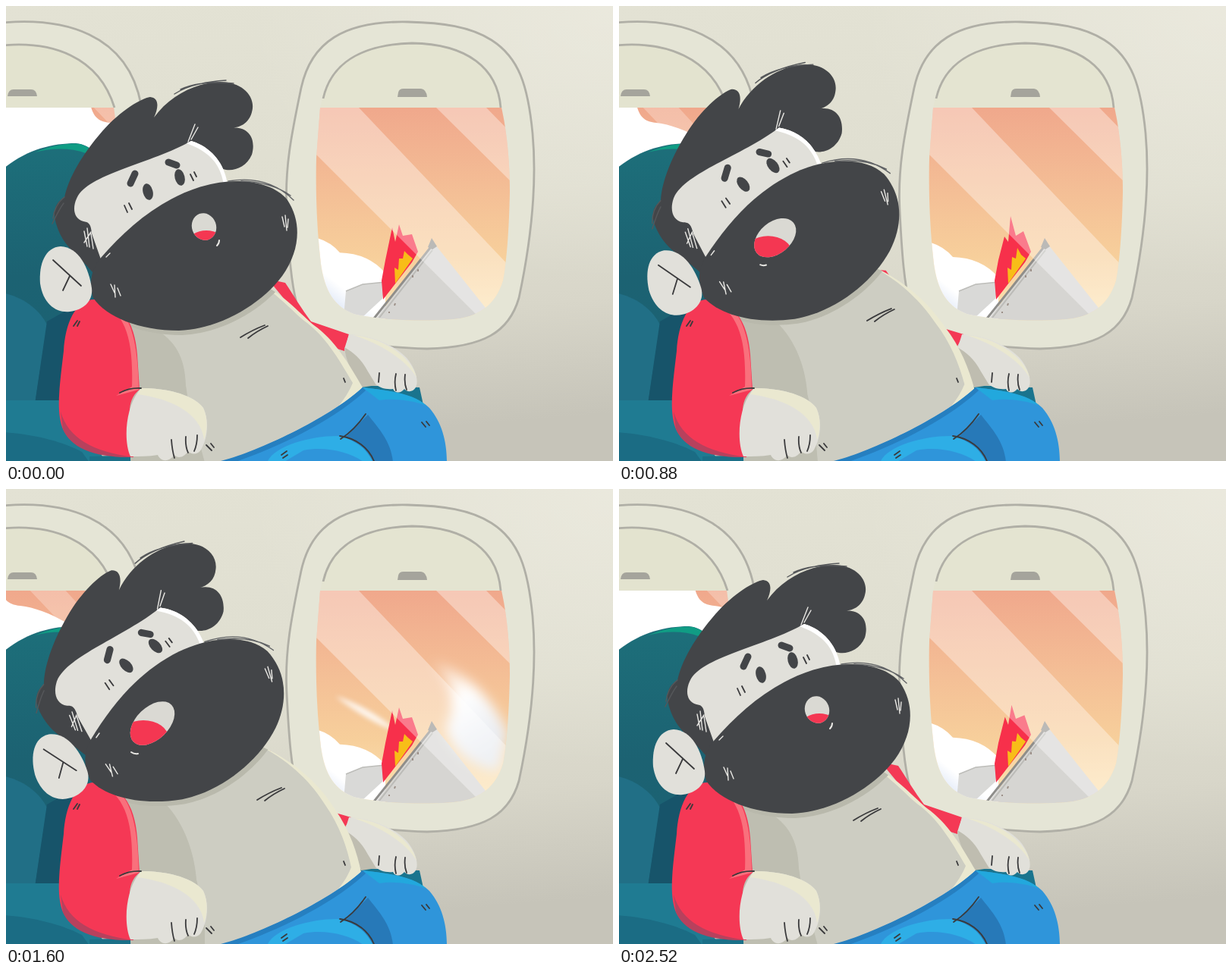
Write an HTML page that moves like this. It is 800 by 600 pixels and loops after 2560 ms.

```html
<!DOCTYPE html>
<html lang="en">
<head>
<meta charset="utf-8">
<title>Calm passenger</title>
<style>
html,body{margin:0;width:100%;height:100%;overflow:hidden;background:#dedbce}
svg{display:block;width:800px;height:600px}
.ink{fill:none;stroke:#3a3a3c;stroke-width:1.8;stroke-linecap:round}
.rim{fill:none;stroke:#b0afa6;stroke-width:2.8}
.thin{fill:none;stroke:#e9e8e4;stroke-width:1.4;stroke-linecap:round}
.hair{fill:#434548}
.skin{fill:#e1e0da}
.cream{fill:#eae8d0}
</style>
</head>
<body>
<svg viewBox="0 0 800 600">
<defs>
  <linearGradient id="wall" x1="0" y1="0" x2=".12" y2="1">
    <stop offset="0" stop-color="#e3e2d4"/><stop offset=".5" stop-color="#dfded0"/>
    <stop offset=".75" stop-color="#d8d6c9"/><stop offset="1" stop-color="#c6c4b9"/>
  </linearGradient>
  <radialGradient id="glow" cx="1" cy="0" r=".6">
    <stop offset="0" stop-color="#f0eee4" stop-opacity=".6"/><stop offset="1" stop-color="#f0eee4" stop-opacity="0"/>
  </radialGradient>
  <linearGradient id="sky" gradientUnits="userSpaceOnUse" x1="0" y1="134" x2="0" y2="415">
    <stop offset="0" stop-color="#f0a88c"/><stop offset=".4" stop-color="#f4bf96"/>
    <stop offset=".7" stop-color="#f7cf9b"/><stop offset="1" stop-color="#fbe4b4"/>
  </linearGradient>
  <linearGradient id="mist" x1=".6" y1=".3" x2=".2" y2="1">
    <stop offset=".35" stop-color="#fff"/><stop offset=".8" stop-color="#cfdcf3"/>
  </linearGradient>
  <linearGradient id="seat" x1="0" y1="0" x2="0" y2="1">
    <stop offset="0" stop-color="#1d6f7a"/><stop offset=".5" stop-color="#1c6272"/><stop offset="1" stop-color="#1a6275"/>
  </linearGradient>
  <linearGradient id="vapour" x1="0" y1="0" x2=".4" y2="1">
    <stop offset="0" stop-color="#fff" stop-opacity=".3"/><stop offset=".4" stop-color="#fff"/>
    <stop offset="1" stop-color="#e3ebf7" stop-opacity=".9"/>
  </linearGradient>
  <filter id="soft" x="-50%" y="-50%" width="200%" height="200%"><feGaussianBlur stdDeviation="8"/></filter>
  <filter id="fine" x="-50%" y="-50%" width="200%" height="200%"><feGaussianBlur stdDeviation="3"/></filter>
  <clipPath id="glass"><path d="M414 134H653C659 160 664 200 664 245C663 295 660 335 655 362C645 395 622 410 590 413C550 416 500 415 462 407C432 398 420 375 415 340C409 290 408 240 409 200Z"/></clipPath>
  <clipPath id="sideGlass"><path d="M0 134H142Q147 165 147 230H0Z"/></clipPath>
  <clipPath id="lips"><ellipse id="lipShape"/></clipPath>
  <clipPath id="torso"><path id="torsoClip"/></clipPath>
  <path id="beardShape" d="M125 332C160 292 202 255 258 238C302 225 350 230 371 256C390 285 388 322 364 356C335 395 280 426 228 428C175 428 132 410 115 385C108 362 114 345 125 332Z"/>
  <path id="frame" d="M530 21C445 19 402 48 389 108C376 170 367 215 370 270C373 330 376 365 383 392C392 432 440 448 555 452C630 450 663 430 676 385C692 310 700 235 694 168C688 105 676 68 640 45C612 27 575 22 530 21Z"/>
  <g id="wisp">
    <path d="M-42 -62C5 -48 38 -12 58 32L45 82C8 78 -22 50 -24 22C-10 2 -14 -32 -42 -62Z" fill="url(#vapour)" filter="url(#soft)"/>
    <path d="M-170 -17Q-125 -3 -88 30Q-125 18 -170 -17Z" fill="#fff" opacity=".85" filter="url(#fine)"/>
  </g>
</defs>

<rect width="800" height="600" fill="url(#wall)"/>
<rect width="800" height="600" fill="url(#glow)"/>

<!-- side window -->
<path d="M-5 22C75 15 160 35 177 125L185 260H-5Z" fill="#e5e5d6"/>
<path class="rim" d="M-5 22C75 15 160 35 178 130"/>
<path d="M-5 52C60 46 122 66 143 134H-5Z" fill="#e3e3cf"/>
<path class="rim" d="M-5 52C60 46 122 66 143 134"/>
<path d="M2 119Q3 110 10 110H33Q40 110 41 119Z" fill="#a5a49c"/>
<g clip-path="url(#sideGlass)">
  <rect y="130" width="150" height="100" fill="url(#sky)"/>
  <path d="M28 130H75L130 190H85ZM112 130H150V170Z" fill="#fff" opacity=".25"/>
  <path id="bank" d="M-200 120H0C4 145 10 152 28 154S68 164 88 176L100 240H-200Z" fill="#fff"/>
</g>

<!-- main window -->
<use href="#frame" fill="#e5e5d6"/>
<use href="#frame" class="rim"/>
<path d="M414 134C423 82 460 51 535 49C610 50 650 82 653 134Z" fill="#e4e4d1"/>
<path class="rim" d="M418 122C428 78 465 51 535 49C608 50 648 82 652 134"/>
<path d="M516 120L517 114Q518 109 524 109H547Q554 110 555 120Z" fill="#a5a49c"/>
<g clip-path="url(#glass)">
  <rect x="400" y="130" width="270" height="290" fill="url(#sky)"/>
  <path id="cloud" d="M405 310Q428 316 440 331Q478 332 500 358V440H405Z" fill="url(#mist)"/>
  <path d="M448 376L470 367L500 364L496 386L470 410H445Z" fill="#d9d9d7"/>
  <path d="M448 376L470 367L500 364" fill="none" stroke="#bdbdb9" stroke-width="1.5"/>
  <path d="M566 315L632 398L620 420H482L556 322Z" fill="#d6d5d2"/>
  <use id="wispA" href="#wisp"/><use id="wispB" href="#wisp"/>
  <path d="M556 318L561 306L568 317L562 321Z" fill="#94928e"/>
  <path id="fire" fill="#f7304b"/>
  <path id="core" fill="#f8bd18"/>
  <path d="M559 319L485 412" stroke="#8f8e8b" stroke-width="3"/>
  <path d="M562 322L492 411" stroke="#bcbbb7" stroke-width="2"/>
  <path d="M543 347v3M536 355v3M513 392l-1 3M505 403v2" stroke="#9c8f88" stroke-width="2"/>
  <path d="M400 187L620 407L670 420V350L465 134H400ZM567 134H633L670 172V236Z" fill="#fff" opacity=".36"/>
</g>

<!-- seat -->
<path d="M-5 216C25 190 60 181 92 181C112 182 128 200 140 240L150 530H-5Z" fill="url(#seat)"/>
<path d="M38 193C62 183 85 180 98 182L112 188L105 194C85 187 62 187 38 193Z" fill="#109c84"/>
<path d="M-5 378C25 384 45 402 54 420L38 525H-5Z" fill="#216f86"/>
<path d="M54 416L100 390V525H38Z" fill="#17546a"/>
<path d="M-5 520H90L130 600H-5Z" fill="#1f7b92"/>
<path d="M-5 562C40 565 75 575 100 588L110 602H-5Z" fill="#1b6c84"/>
<path d="M110 594L170 592L262 572V602H110Z" fill="#1b7088"/>
<path d="M462 500L545 503L550 526L470 530Z" fill="#1a748e"/>

<!-- far arm -->
<path id="farArm" fill="#f43955"/>
<path d="M452 433C482 434 512 447 528 464C541 480 544 495 540 503C536 510 528 509 525 505C520 511 513 511 510 505C500 506 492 503 488 499L470 502C455 480 448 465 446 452Z" class="skin"/>
<path d="M446 450C458 457 468 465 477 482L488 500L468 503C455 482 447 465 446 450Z" fill="#bfbdb0"/>
<path d="M458 434C495 437 535 462 541 490C528 466 490 444 458 434Z" class="cream"/>
<path class="ink" d="M492 484L491 496M514 485C512 493 512 499 514 507M526 486C525 494 526 501 528 506"/>

<!-- torso -->
<path id="torsoEdge" class="cream"/>
<g clip-path="url(#torso)">
  <path id="torsoFill" fill="#cdcdc2" transform="translate(-13 -6)"/>
  <path id="torsoShade" fill="#bebeb1"/>
  <use id="beardShade" href="#beardShape" fill="#b9b9ac"/>
</g>
<path id="crease" class="ink" d="M309 437Q325 427 341 421M319 438Q330 429 345 422"/>
<path class="ink" d="M445 491l2 5M264 579l7 7M270 577l4 5"/>

<!-- trousers -->
<path d="M470 503C505 507 540 512 558 530C575 550 581 575 581 602H283C325 590 425 545 470 503Z" fill="#2f95da"/>
<path d="M470 503C505 507 538 511 554 527C535 520 510 517 492 520Z" fill="#22a8dd"/>
<path d="M477 539C492 558 508 575 510 602H484C475 586 460 575 447 569Z" fill="#2779b8"/>
<path d="M345 600C355 580 400 567 437 567C460 572 475 582 484 602H472C455 588 420 580 392 586L365 602Z" fill="#2eaee6"/>
<path d="M283 600C325 590 425 545 470 503L474 507C425 552 350 585 300 602Z" fill="#267fc0"/>
<path class="ink" d="M474 538C465 551 455 562 441 571M440 567C462 570 478 583 485 600M548 549l5 6M554 548l4 5M363 592l7-5M365 596l6-4"/>

<!-- near arm -->
<path d="M118 387C92 386 78 418 76 455C70 505 66 535 75 558C88 585 120 594 168 595L163 540C162 522 168 512 176 506L173 460C170 415 150 388 118 387Z" fill="#f53855"/>
<path d="M122 387C158 392 174 425 175 506L145 514L166 502C168 440 158 405 122 387Z" fill="#f9707c"/>
<path d="M72 535C82 570 115 588 168 595C115 596 85 582 75 558Z" fill="#b7415d"/>
<path d="M178 504C212 504 246 512 260 530C268 546 266 570 257 585C253 592 244 592 240 587C234 596 226 597 222 592C214 602 204 601 200 592C188 594 176 594 164 594C154 572 158 525 178 504Z" class="skin"/>
<path d="M178 504C212 504 246 512 260 530C267 545 265 562 261 572C258 545 232 520 173 512Z" class="cream"/>
<path class="ink" d="M218 572Q219 586 222 596M237 568Q236 580 240 589M252 566Q252 578 248 587M150 510Q163 503 178 504M94 415l-5 7M97 416l-3 6"/>

<!-- head -->
<g id="head">
  <path class="hair" d="M125 333L115 352C95 328 76 318 67 290C60 270 66 258 77 253C82 227 101 195 127 165C152 137 178 122 190 120C201 121 202 132 195 147C216 118 250 101 282 100C312 100 330 120 324 140C320 155 308 161 294 161C320 157 330 175 324 196C316 214 298 219 286 215C272 194 258 182 244 178Z"/>
  <path class="thin" d="M222 116Q245 101 290 98M230 110Q255 98 300 102M62 280Q64 262 77 252M61 287Q70 268 76 260" style="stroke:#55575a"/>
  <path class="skin" d="M244 178C272 186 289 210 292 236L200 300L125 334L113 300C112 286 108 285 102 284C88 280 87 264 95 250C115 220 190 208 244 178Z"/>
  <path d="M244 178C272 186 289 210 292 236L287 236C283 208 268 192 238 181Z" fill="#fff"/>
  <use href="#beardShape" class="hair"/>
  <path class="thin" d="M293 231Q345 222 379 256M310 231Q350 232 375 250" style="stroke:#606265"/>
  <path class="thin" d="M240 179L249 156M244 176L253 160M103 297L107 317M107 293L110 318M103 312L112 298M112 300L115 320M364 278L367 291M368 276L370 296M372 281L371 292M138 367L143 378M143 368L144 384M147 372L151 382M132 331L137 326"/>
  <path class="skin" d="M72 317C52 318 43 340 45 366C49 393 66 405 84 403C102 401 115 389 113 372C109 345 96 318 72 317Z"/>
  <path class="ink" d="M62 335L99 369M84 356L75 375"/>
  <path d="M164 234L170 221M214 206L225 210" stroke="#434548" stroke-width="9" stroke-linecap="round"/>
  <ellipse id="eyeL" class="hair" rx="6.5" ry="11"/>
  <ellipse id="eyeR" class="hair" rx="6.5" ry="11"/>
  <path class="ink" d="M156 263l4 9M162 260l4 8M243 222l4 8M248 219l3 6"/>
</g>
<g clip-path="url(#lips)">
  <rect x="130" y="250" width="180" height="110" fill="#dad9d3"/>
  <ellipse id="tongue" fill="#f43752"/>
</g>
<path id="lipMark" class="thin" style="stroke-width:2"/>
</svg>
<script>
const LOOP = 2560, STEP = 40, BREATH = 640, FLICKER = 320, TAU = Math.PI * 2;
const $ = id => document.getElementById(id);
const set = (id, attrs) => { for (const k in attrs) $(id).setAttribute(k, attrs[k]); };
const lerp = (a, b, k) => a + (b - a) * k;
const NUM = /-?\d+(\.\d+)?/g;

// Blend two path strings that share the same commands.
function blend(a, b, k) {
  const to = b.match(NUM);
  let i = 0;
  return a.replace(NUM, n => lerp(+n, +to[i++], k).toFixed(2));
}

// Quick inhale, softer exhale, short rest.
function breath(t) {
  const ms = t % BREATH;
  return ms <= 320 ? (ms / 320) ** .72 : Math.max(0, 1 - (ms - 320) / 280) ** 1.5;
}

function drawSky(t) {
  const turn = TAU * t / BREATH;
  set('bank', { transform: `translate(${50 + 62 * Math.cos(turn - .3)})` });
  set('cloud', { transform: `translate(0 ${-8 * Math.sin(turn + .8)})` });
  drawWisp('wispA', t - 280);
  drawWisp('wispB', t - 1430);
}

function drawWisp(id, dt) {
  set(id, {
    transform: `translate(${400 + 1.2 * dt} ${205 + .5 * dt})`,
    visibility: Math.abs(dt) < 380 ? 'visible' : 'hidden'
  });
}

function drawFire(t) {
  const c = Math.cos(TAU * t / FLICKER), s = Math.sin(TAU * t / FLICKER);
  set('fire', { d: `M497 387L495 362 500 335 ${508 + c} ${292 - 12 * s} 513 311
    ${516 + 2 * c} ${277 + 11 * c} 523 303 ${533 + 2 * c} ${301 + 4 * s} 543 324 535 338Z` });
  set('core', { d: `M513 366L512 345 517 348 518 ${331 + 2 * c} 523 333 525 ${319 + 4 * c} 530 328 536 333Z` });
}

function drawBody(p) {
  const d = blend(
    'M155 415L340 368C372 385 394 413 410 424C438 446 455 478 470 503C440 575 340 600 285 608L165 608Z',
    'M155 405L338 340C385 362 415 392 434 423C453 450 463 480 468 505C440 575 340 600 285 608L165 608Z', p);
  for (const id of ['torsoClip', 'torsoEdge', 'torsoFill']) set(id, { d });
  set('torsoShade', { d: blend(
    'M150 400L195 425C222 440 236 462 237 500L240 520L262 602H150Z',
    'M150 400L205 410C232 435 248 475 251 515L262 560L262 602H150Z', p) });
  set('farArm', { d: blend(
    'M345 360L368 365C378 380 390 400 402 416L452 433L446 455L415 445Z',
    'M335 345L348 345C358 360 390 400 410 420L455 433L446 447L425 440Z', p) });
  set('crease', { transform: `translate(${22 * p} ${-27 * p})` });
}

function drawHead(p) {
  const tilt = `matrix(1 ${-.163 * p} ${.18 * p} 1 ${-72.7 * p} ${18.3 * p})`;
  const turn = `rotate(${-14 - 20 * p})`;
  set('head', { transform: tilt });
  set('beardShade', { transform: `translate(4 6) ${tilt}` });
  set('eyeL', { transform: `translate(187 245) ${turn}` });
  set('eyeR', { transform: `translate(229 226) ${turn}` });

  const x = lerp(261, 193, p), y = lerp(291, 309, p);
  set('lipShape', { cx: x, cy: y, rx: lerp(16, 35, p), ry: lerp(18, 21.5, p),
    transform: `rotate(${lerp(-20, -44, p)} ${x} ${y})` });
  set('tongue', { cx: lerp(264, 181, p), cy: lerp(312, 328, p), rx: lerp(24, 33, p), ry: lerp(16, 23, p) });
  set('lipMark', { d: blend('M278 316Q281 313 281 309', 'M165 347Q169 350 174 349', p) });
}

function draw(t) {
  const p = breath(t);
  drawSky(t);
  drawFire(t);
  drawBody(p);
  drawHead(p);
}

const start = performance.now();
function tick() {
  const t = (performance.now() - start) % LOOP;
  draw(Math.floor(t / STEP) * STEP);
  requestAnimationFrame(tick);
}
draw(0);
requestAnimationFrame(tick);
</script>
</body>
</html>
```
